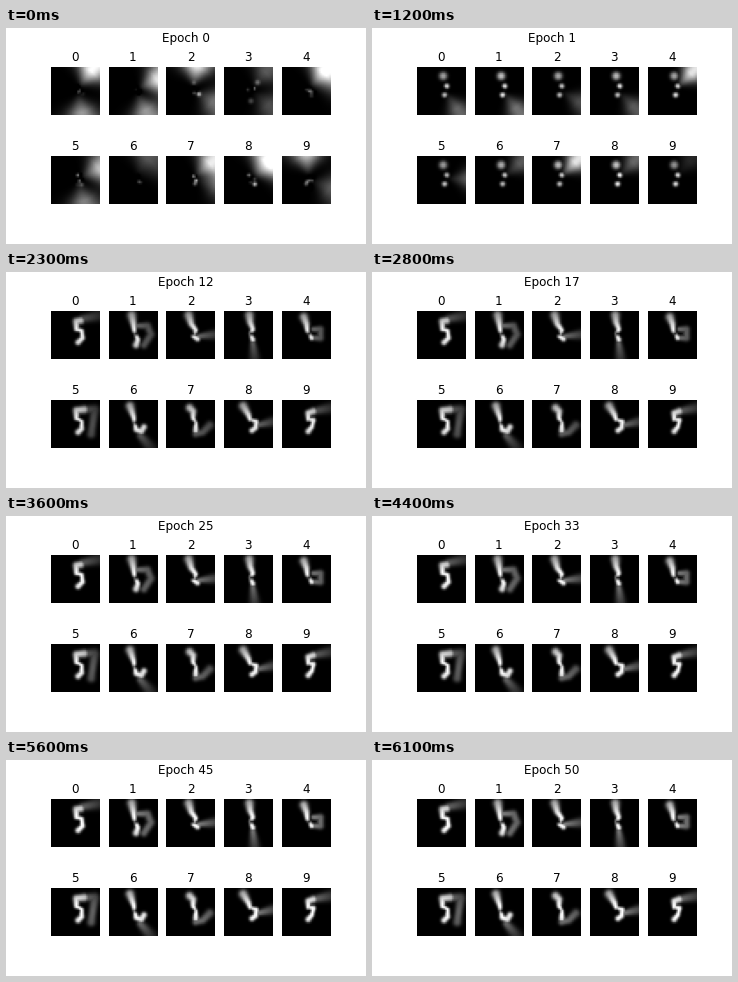
Recreate the animation shown at these times as a matplotlib script. Size 360 by 216 pixels, loop 7.2 s.

```python
import numpy as np
import matplotlib.pyplot as plt
from matplotlib.animation import FuncAnimation

SIZE = 28
CENTRE = np.array([15.3, 13.6])
FRAMES, INTERVAL = 72, 100
HOLD, LAST_EPOCH, SETTLE_EPOCH = 11, 50, 7

# Bright pen stroke learned for each digit, in picture units.
PEN = [
    [(17, 6), (14.5, 6.5), (14.5, 11), (17.5, 12), (18, 16), (15.5, 18.5)],
    [(13, 3), (14, 8), (14.5, 12), (16.5, 17), (15.5, 20)],
    [(13, 3), (14.5, 8), (17, 11.5), (15.5, 15), (18, 16.5)],
    [(14.5, 3), (15, 7), (16.5, 11), (15, 13.5), (16.5, 17)],
    [(12.5, 4), (14, 8), (14.5, 12), (17, 16)],
    [(19, 6), (14.5, 6.5), (14.5, 11), (17.5, 13), (17.5, 17), (15.5, 19)],
    [(12, 4), (14, 10), (15.5, 17.5), (18.5, 18.5), (20, 16)],
    [(13.5, 5), (15.5, 7), (15.5, 11), (17, 14), (17, 18)],
    [(11, 4), (14, 9), (15, 12), (18.5, 13), (18, 16.5), (16, 18)],
    [(18, 7), (15, 8), (15, 12), (18, 12), (17, 16), (15, 18.5)],
]
# Grey smear that trails away from the stroke.
SMEAR = [
    [(18, 5), (28, 3)],
    [(16, 9), (22, 9), (24, 14), (20, 20)],
    [(19, 15), (28, 14)],
    [(16.5, 19), (17.5, 28)],
    [(17, 16), (22, 16), (22, 11), (18, 11)],
    [(19, 6), (25, 6), (23, 20)],
    [(18, 21), (24, 28)],
    [(17, 20), (21, 19), (25, 15)],
    [(19, 15), (28, 13)],
    [(18, 7), (28, 5)],
]
# Bearing in degrees (clockwise from the right) and strength of each beam.
START_BEAMS = [
    [(-55, 1), (80, 0.6)], [(-25, 0.9), (65, 0.6)], [(-80, 0.9), (30, 0.45)],
    [(-50, 0.35), (40, 0.3)], [(-52, 1), (-15, 0.3)], [(-25, 0.75), (75, 0.5)],
    [(-65, 0.3), (-25, 0.15)], [(-42, 0.9), (10, 0.4)], [(-30, 0.8), (-60, 0.6)],
    [(-95, 0.75), (22, 0.35)],
]
FIRST_BEAMS = [(55, 0.4), (52, 0.45), (30, 0.3), (45, 0.35), (-45, 0.9),
               (0, 0.35), (-40, 0.35), (-45, 0.9), (-45, 0.4), (-50, 0.15)]
COLUMN = [(15, 5.7), (17, 11.5), (15.8, 16.5)]

plt.rcParams["font.family"] = "DejaVu Sans"
ys, xs = np.mgrid[0:SIZE, 0:SIZE] + 0.5
radius = np.hypot(xs - CENTRE[0], ys - CENTRE[1])
bearing = np.degrees(np.arctan2(ys - CENTRE[1], xs - CENTRE[0]))
pupil = 1 - 0.85 * np.exp(-(radius / 1.3) ** 2)


def spot(point, level=1.0, scale=1.0):
    """A flat-topped dot that blurs and dims with distance from the centre."""
    reach = np.hypot(*(point - CENTRE))
    width = scale * (0.9 + 0.16 * reach)
    distance = np.hypot(xs - point[0], ys - point[1])
    return level * (1.2 - 0.05 * reach) * np.exp(-(distance / width) ** 2.5)


def stroke(points, level=1.0):
    points = np.array(points, float)
    knots = np.arange(len(points))
    steps = np.linspace(0, knots[-1], 12 * len(points))
    path = np.column_stack([np.interp(steps, knots, axis) for axis in points.T])
    return np.max([spot(point, level) for point in path], axis=0)


def beam(angle, level, spread=24):
    turn = (bearing - angle + 180) % 360 - 180
    ramp = np.clip((radius - 2) / 11, 0, 1)
    return level * ramp * np.exp(-(turn / spread) ** 2)


def starting_image(digit):
    rng = np.random.default_rng(digit)
    image = sum(beam(*b, spread=32) for b in START_BEAMS[digit])
    for point in rng.normal(CENTRE + (1.2, 0.4), (1.3, 1.8), (7, 2)):
        image = image + spot(point, rng.uniform(-0.6, 0.7), 0.8)
    return image * pupil


def first_image(digit):
    levels = np.random.default_rng(digit + 20).uniform(0.7, 1, len(COLUMN))
    dots = [spot(np.array(p), level, 1.1) for p, level in zip(COLUMN, levels)]
    return np.max([*dots, beam(*FIRST_BEAMS[digit])], axis=0) * pupil


starts = [starting_image(d) for d in range(10)]
firsts = [first_image(d) for d in range(10)]
pens = [stroke(points) * pupil for points in PEN]
smears = [stroke(points, 0.5) * pupil for points in SMEAR]


def render(digit, epoch):
    if epoch == 0:
        return np.clip(starts[digit], 0, 1)
    drift = np.clip(np.log(epoch / SETTLE_EPOCH) / np.log(LAST_EPOCH / SETTLE_EPOCH), 0, 1)
    settled = np.maximum((0.88 + 0.12 * drift) * pens[digit],
                         (0.7 + 0.3 * drift) * smears[digit])
    fresh = max(0, (SETTLE_EPOCH - epoch) / (SETTLE_EPOCH - 1)) ** 2
    return np.clip(fresh * firsts[digit] + (1 - fresh) * settled, 0, 1)


fig, axes = plt.subplots(2, 5, figsize=(5, 3), dpi=72)
fig.subplots_adjust(left=0.125, right=0.9, bottom=0.125, top=0.88, wspace=0.2, hspace=0.2)
heading = fig.suptitle("Epoch 0", fontsize=12)
pictures = []
for digit, ax in enumerate(axes.flat):
    ax.set_title(str(digit), fontsize=12, pad=6)
    ax.axis("off")
    pictures.append(ax.imshow(render(digit, 0), cmap="gray", vmin=0, vmax=1))


def update(frame):
    epoch = min(max(frame - HOLD, 0), LAST_EPOCH)
    heading.set_text(f"Epoch {epoch}")
    for digit, picture in enumerate(pictures):
        picture.set_data(render(digit, epoch))
    return [heading, *pictures]


anim = FuncAnimation(fig, update, frames=FRAMES, interval=INTERVAL, repeat=True, repeat_delay=0)
plt.show()
```
